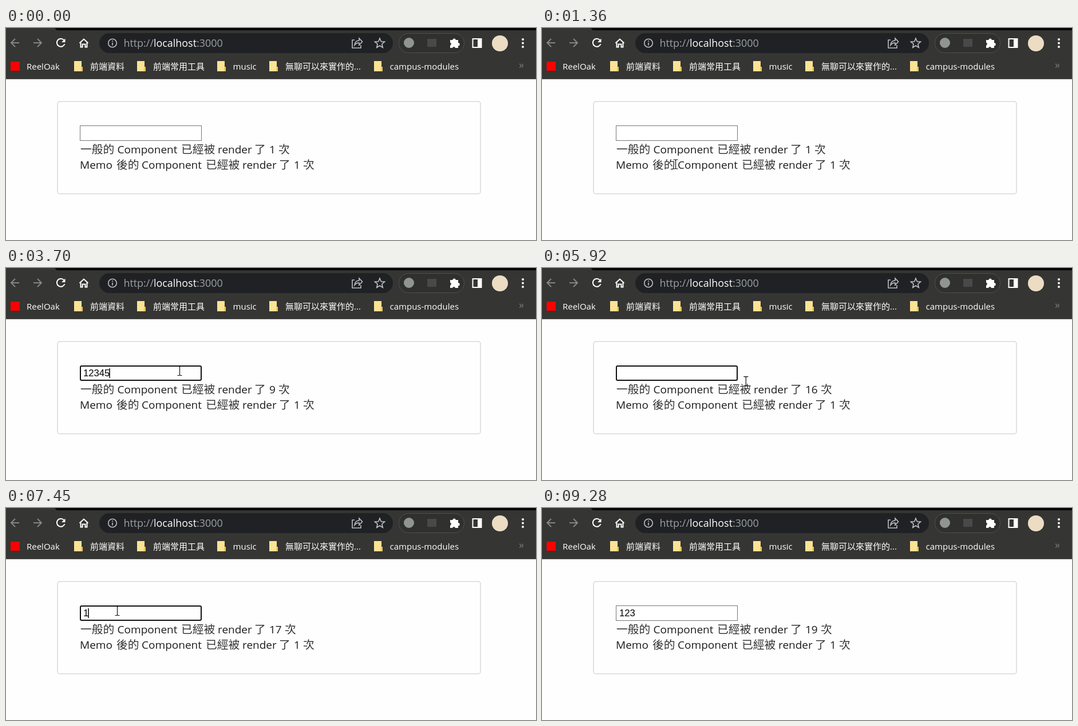
These frames come from a looping animation (926 px wide and 372 px high, 9.92 s). An HTML page:

```html
<!DOCTYPE html>
<html lang="zh-Hant">
<head>
<meta charset="utf-8">
<title>Memo render demo</title>
<style>
html, body { margin: 0; width: 100%; height: 100%; overflow: hidden; background: #fefefe; }
svg { display: block; }
text { font-family: "Open Sans", "Noto Sans", "Noto Sans CJK TC", "Noto Sans CJK", sans-serif; white-space: pre; }
#bookmarks text { font-size: 15px; fill: #fff; }
#lines text { font-size: 19px; fill: #1c1c1c; }
#lines .cjk { font-size: 19.8px; font-weight: 300; fill: #333; }
#value { font: 16.67px "Liberation Sans", "Noto Sans CJK TC", "Noto Sans CJK", sans-serif; }
.line { fill: none; stroke: #fff; stroke-width: 2; }
.dim { stroke: #858583; }
.thin { stroke: #bdc1c6; stroke-width: 1.6; }
</style>
</head>
<body>
<svg width="926" height="372" viewBox="0 0 926 372">
  <rect width="926" height="90" fill="#353533"/>
  <rect y="89" width="926" height="1" fill="#5c5c5a"/>
  <path d="M86 0H926V4H92Q86 4 86 0" fill="#060606"/>
  <path class="line dim" d="M23 26H9m7-7l-7 7 7 7M48 26H62m-7-7l7 7-7 7"/>
  <circle id="hover" cx="96" cy="26" r="17.5" fill="#4c4c4a"/>
  <g id="reload">
    <path class="line" d="M101 21A7 7 0 1 0 102.500 28"/>
    <path d="M103.500 18.500V25H97z" fill="#fff"/>
  </g>
  <path id="stop" class="line dim" d="M90 20l12 12m0-12l-12 12"/>
  <path class="line" d="M128.500 26.500l7.500-7 7.500 7M130.500 25v8.500h3v-5h5v5h3v-8.500"/>

  <rect x="163" y="9" width="513" height="35" rx="17.500" fill="#202124"/>
  <circle class="line thin" cx="186" cy="26.500" r="7.300"/>
  <path class="line thin" d="M186 25.500v5m0-8.500v1.800"/>
  <text x="205.500" y="33" font-size="17.900" fill="#9aa0a6">http://<tspan fill="#fff">localhost</tspan>:3000</text>
  <path class="line thin" d="M609 21h-4v14h15v-5M609 30q1-8 8-8v-4l5.500 6-5.500 6v-4q-5 0-8 4z"/>
  <path id="star" class="line thin"/>

  <rect x="686.500" y="9.500" width="114" height="34" rx="17" fill="#30302f" stroke="#50504e"/>
  <circle cx="704" cy="26" r="9" fill="#909592"/>
  <rect x="736" y="19" width="16" height="14" fill="#49494b"/>
  <path d="M776 21h4.500a2.600 2.600 0 1 1 5.200 0H790v5a2.700 2.700 0 1 1 0 5.400V35h-5a2.600 2.600 0 0 0-5 0h-4v-4.500a2.600 2.600 0 0 0 0-5z" fill="#fff"/>
  <rect class="line" x="815.500" y="19" width="15" height="15"/>
  <path d="M824 19h7v15h-7z" fill="#fff"/>
  <circle cx="863" cy="27" r="14" fill="#ecdcc4"/>
  <g fill="#fff"><circle cx="903" cy="20" r="2"/><circle cx="903" cy="26.500" r="2"/><circle cx="903" cy="33" r="2"/></g>

  <g id="bookmarks"><rect x="8" y="59" width="16" height="16" fill="#f00"/></g>
  <text x="896" y="71" font-size="18" fill="#7c7c7a">»</text>

  <rect x="90" y="129" width="739" height="162" rx="4" fill="#fefefe" stroke="#e2e2e2" stroke-width="2"/>
  <rect id="blurred" x="129.500" y="171.500" width="212" height="26" fill="#fff" stroke="#767676"/>
  <rect id="focused" x="130" y="172" width="211" height="25" rx="2" fill="#fff" stroke="#101010" stroke-width="2"/>
  <text id="value" x="135" y="190"></text>
  <path id="compose" stroke="#222" stroke-dasharray="1 1"/>
  <path id="caret" stroke="#000" stroke-width="1.500"/>
  <g id="lines"></g>

  <g id="pointer">
    <path id="arrow" d="M0 0V16.500L3.800 13 6.500 19.200 9 18.100 6.400 12H11.800z" fill="#0a0a0a" stroke="#fff"/>
    <path id="beam" d="M-4 -8.500h3l1 1 1-1h3M0 -7.500v14M-4 7.500h3l1-1 1 1h3" fill="none" stroke="#111" stroke-width="1.200"/>
  </g>
</svg>
<script>
const LOOP = 9920, BLINK = 480;
const $ = id => document.getElementById(id);
const show = (id, on) => $(id).setAttribute('visibility', on ? 'visible' : 'hidden');

function add(parent, tag, attrs, content = '') {
  const el = document.createElementNS('http://www.w3.org/2000/svg', tag);
  for (const key in attrs) el.setAttribute(key, attrs[key]);
  el.textContent = content;
  return $(parent).appendChild(el);
}

const star = Array.from({length: 10}, (_, i) => {
  const r = i % 2 ? 4 : 9, a = i * Math.PI / 5;
  return [653 + r * Math.sin(a), 27 - r * Math.cos(a)];
});
$('star').setAttribute('d', 'M' + star.join('L') + 'z');

const bookmarks = [[36, 'ReelOak'], [147, '前端資料'], [257, '前端常用工具'],
  [396.5, 'music'], [488, '無聊可以來實作的...'], [670.5, 'campus-modules']];
for (const [x, label] of bookmarks) add('bookmarks', 'text', {x, y: 73}, label);
for (const x of [119, 229, 369, 460, 643]) {
  add('bookmarks', 'path', {d: `M${x} 58h13v10h2v8h-15z`, fill: '#ffe394'});
  add('bookmarks', 'path', {d: `M${x + 12} 68h3v8h-3z`, fill: '#f0c75c'});
}

function word(x, y, s) {
  return add('lines', 'text', {x, y, class: /[a-z0-9]/i.test(s) ? '' : 'cjk'}, s);
}
[[130, '一般的'], [194.5, 'Component'], [306, '已經被'], [370, 'render'], [434, '了']]
  .forEach(([x, s]) => word(x, 219.5, s));
[[129, 'Memo'], [193, '後的'], [237, 'Component'], [349, '已經被'], [413, 'render'],
  [477, '了'], [503, '1'], [519, '次']].forEach(([x, s]) => word(x, 246.5, s));
const counter = word(460, 219.5, '1'), unit = word(476, 219.5, '次');

// Every edit renders the plain component once more.
const edits = [[0, ''], [2090, 'ㄅ'], [2350, 'ㄅㄉ'], [2830, ''],
  [2990, '1'], [3090, '12'], [3190, '123'], [3450, '1234'], [3700, '12345'], [3930, '123456'],
  [4530, '12345'], [4630, '1234'], [4730, '123'], [4830, '12'], [4930, '1'], [5030, ''],
  [7450, '1'], [7540, '12'], [7630, '123']];
const focusSpans = [[1780, 6350], [7220, 8500]];

// Pointer path: time, x, y
const path = [[30, 811, 362], [300, 520, 200], [620, 103, 20], [760, 103, 20],
  [970, 140, 115], [1250, 215, 255], [1780, 303.5, 181], [5890, 303.5, 181], [5920, 356, 199],
  [6300, 470, 214], [6650, 500, 236], [6890, 440, 238], [7250, 194.5, 181], [7930, 194.5, 181],
  [8400, 440, 214], [8900, 528, 238], [9250, 731, 330]];

function pointerAt(t) {
  const i = path.findIndex(p => p[0] > t);
  if (i < 0) return path.at(-1).slice(1);
  if (!i) return path[0].slice(1);
  const [t0, x0, y0] = path[i - 1], [t1, x1, y1] = path[i];
  const k = (t - t0) / (t1 - t0);
  return [x0 + (x1 - x0) * k, y0 + (y1 - y0) * k];
}

function drawPointer(t) {
  const [x, y] = pointerAt(t), on = t >= 30 && t < 9280;
  const overInput = x > 129 && x < 342 && y > 171 && y < 198;
  const overText = x > 129 && x < 539 && y >= 198 && y < 252;
  const beam = overInput || overText;
  $('pointer').setAttribute('transform', `translate(${x} ${y})`);
  show('beam', on && beam);
  show('arrow', on && !beam);
  show('hover', on && Math.hypot(x - 96, y - 26) < 17.5);
  const loading = t >= 760 && t < 1060;
  show('stop', loading);
  show('reload', !loading);
}

function drawPage(t) {
  const n = edits.findLastIndex(e => e[0] <= t);
  const [time, value] = edits[n];
  const span = focusSpans.find(([a, b]) => t >= a && t < b);
  show('focused', span);
  show('blurred', !span);
  $('value').textContent = value;
  const end = 135 + (value ? Math.floor($('value').getComputedTextLength()) : 0);
  const since = span ? t - Math.max(time, span[0]) : 0;
  $('caret').setAttribute('d', `M${end} 176V193`);
  show('caret', span && since % (2 * BLINK) < BLINK);
  $('compose').setAttribute('d', `M135 194.5H${end}`);
  show('compose', /ㄅ/.test(value));
  counter.textContent = n + 1;
  unit.setAttribute('x', n < 9 ? 476 : 487);
}

function frame() {
  const t = performance.now() % LOOP;
  drawPointer(t);
  drawPage(t);
  requestAnimationFrame(frame);
}
frame();
</script>
</body>
</html>
```
